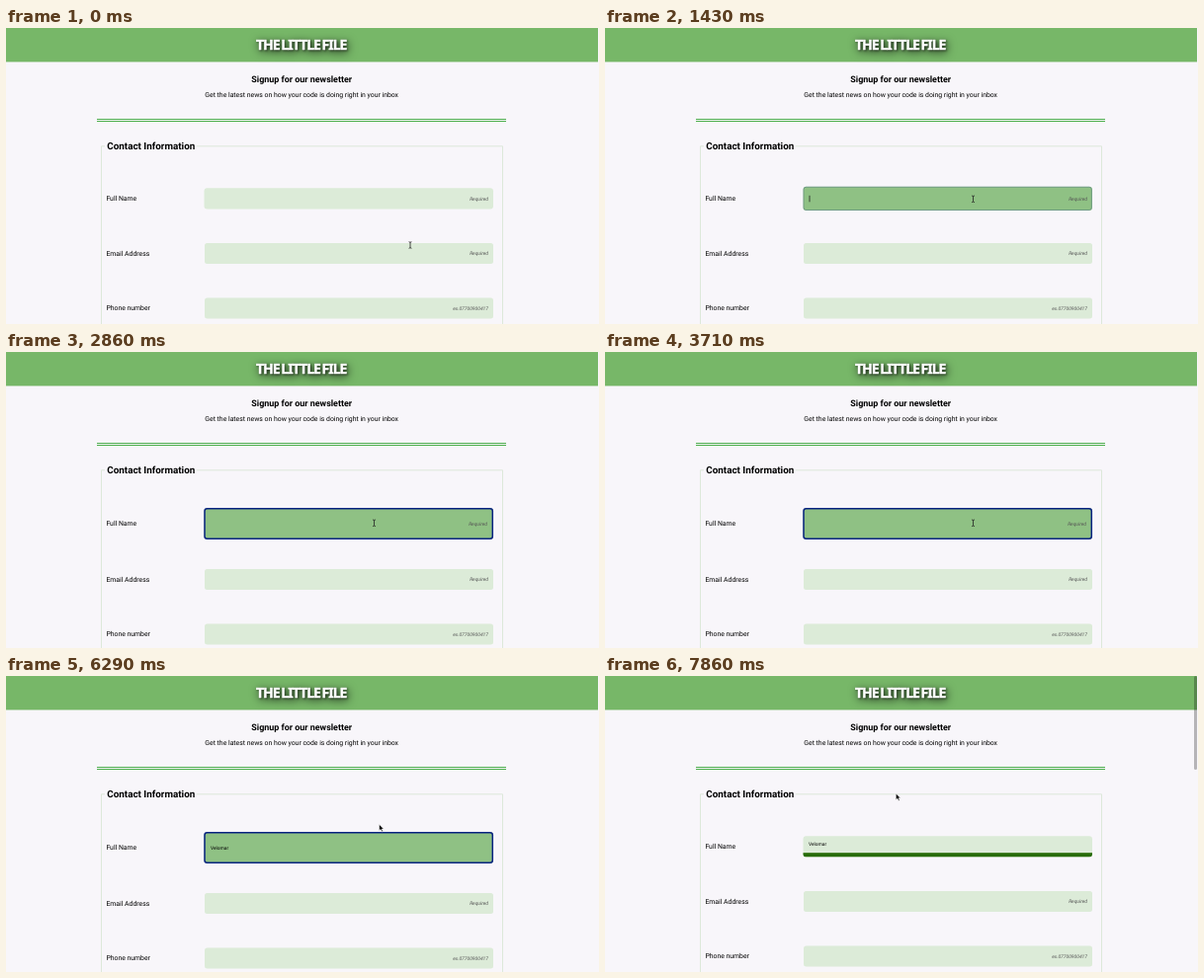
Recreate the animation shown at these times as an HTML page. Size 600 by 300 pixels, loop 8 s.

```html
<!DOCTYPE html>
<html lang="en">
<head>
<meta charset="utf-8">
<title>Newsletter signup</title>
<style>
  html, body { margin: 0; width: 100%; height: 100%; overflow: hidden; background: #f8f6fa; }
  svg { display: block; width: 600px; height: 300px; font: 6.87px Roboto, sans-serif; text-rendering: geometricPrecision; }
  .brand { font: 800 14px "Noto Sans", "Open Sans", sans-serif; font-stretch: 62.5%; letter-spacing: -1px; word-spacing: -1px;
    fill: #fff; stroke: #fff; stroke-width: .4;
    filter: drop-shadow(1px 1px 1px #0009) drop-shadow(1px 2px 4px #000a); }
  .mid { text-anchor: middle; }
  .bold { font-weight: 700; }
  .hint { font-size: 4.95px; font-style: italic; text-anchor: end; fill: #555; }
  .value { font-size: 4.9px; }
  .list { filter: drop-shadow(0 2px 2px #0005); }
</style>
</head>
<body>
<svg viewBox="0 0 600 300">
  <rect width="599" height="34.4" fill="#77b768"/>
  <text class="brand mid" x="298.7" y="21.8">THE LITTLE FILE</text>
  <text class="mid bold" x="299.2" y="55.2" font-size="8.93">Signup for our newsletter</text>
  <text class="mid" x="299.2" y="70.3">Get the latest news on how your code is doing right in your inbox</text>
  <path d="M92 92.5H506M92 94.5H506" stroke="#4cae4c"/>
  <path d="M100 119.8H96.5V300M193 119.8H502.5V300" fill="none" stroke="#dde8da"/>
  <text class="bold" x="102.3" y="123.1" font-size="9.85">Contact Information</text>

  <text id="nameLabel" x="101.4" y="175.3">Full Name</text>
  <g id="rows">
    <text x="101.4" y="231.1">Email Address</text>
    <rect x="201" y="218" width="292" height="21" rx="2.5" fill="#dcebd8"/>
    <text class="hint" x="488" y="230.3">Required</text>
    <text x="101.4" y="286.4">Phone number</text>
    <rect x="201" y="273.5" width="292" height="21" rx="2.5" fill="#dcebd8"/>
    <text class="hint" x="488" y="285.8">ex.07700900417</text>
  </g>

  <clipPath id="clip"><rect id="clipBox" x="200.5" width="292.5" rx="3"/></clipPath>
  <rect id="field" x="200.5" width="292.5" rx="3"/>
  <rect id="bar" x="200" width="294" clip-path="url(#clip)"/>
  <rect id="ring" x="201" width="291.3" rx="2.5" fill="none"/>
  <text id="nameHint" class="hint">Required</text>
  <text id="value" class="value"></text>
  <rect id="caret" width=".8" height="6.5" fill="#222"/>

  <g id="list">
    <rect class="list" x="200.5" y="190.3" width="292" height="8.5" fill="#fff"/>
    <text x="202" y="196.4" font-size="5.2">Velomar</text>
  </g>
  <rect id="thumb" x="596" width="3" height="95" rx="1.5" fill="#0004"/>

  <path id="arrow" d="M0 0V6.6L1.6 5.2L2.7 7.6L3.9 7.1L2.8 4.8H4.8Z" stroke="#fff" stroke-width=".6"/>
  <path id="beam" d="M-1.4-3.3Q0-3.3 0-2.4Q0-3.3 1.4-3.3M0-2.5V2.5M-1.4 3.3Q0 3.3 0 2.4Q0 3.3 1.4 3.3" fill="none" stroke="#222" stroke-width=".8"/>
</svg>
<script>
const LOOP = 8000, FOCUS = 1000, PICK = 5570, BLUR = 6860;
const KEYS = [4000, 4290, 4570];
const NAME = 'Velomar';
const $ = Object.fromEntries([...document.querySelectorAll('[id]')].map(e => [e.id, e]));

const set = (el, attrs) => { for (const k in attrs) el.setAttribute(k, attrs[k]); };
const show = (el, on) => set(el, { visibility: on ? 'visible' : 'hidden' });
const mix = (a, b, p) => a + (b - a) * p;

// Interpolates [time, value] stops.
function track(t, stops) {
  let i = 1;
  while (i < stops.length - 1 && t > stops[i][0]) i++;
  const [t0, a] = stops[i - 1], [t1, b] = stops[i];
  return mix(a, b, Math.min(1, Math.max(0, (t - t0) / (t1 - t0))));
}

const TOP = [[FOCUS, 162.3], [1430, 160.7], [2000, 158.3], [BLUR, 158.3], [7290, 158.8], [7860, 162.3]];
const BOTTOM = [[FOCUS, 183.5], [1430, 185], [2000, 189.8], [BLUR, 189.8], [7290, 186.7], [7860, 183.5]];
const MOUSE_X = [[140, 409], [710, 372.5], [4570, 372.5], [4860, 381.5], [5300, 378], [5710, 376],
  [6290, 377.5], [6860, 362], [7290, 332.5], [7860, 294.3]];
const MOUSE_Y = [[140, 220], [710, 173.3], [4570, 173.3], [4860, 207.2], [5300, 195], [5710, 194],
  [6290, 150.3], [6860, 126], [7290, 118], [7860, 119]];

function draw(t) {
  const focused = t >= FOCUS && t < BLUR, done = t >= BLUR;
  const top = track(t, TOP), bottom = track(t, BOTTOM);
  const shift = focused ? track(t, [[1430, 0], [2000, 1]]) : 0;
  const grown = focused ? track(t, [[FOCUS, 0], [2000, 1]]) : 0;
  const box = { y: top, height: bottom - top };

  set($.field, { ...box, fill: focused ? '#8fc184' : '#dcebd8' });
  set($.clipBox, box);
  set($.ring, {
    y: top + .5, height: bottom - top - 1,
    stroke: `rgba(10,36,130,${grown ** 1.6})`, 'stroke-width': mix(.5, 1.5, grown)
  });
  show($.ring, focused);

  const fade = track(t, [[BLUR, 0], [7290, .1], [7860, 1]]);
  const thick = track(t, [[BLUR, 1], [7860, 4.3]]);
  set($.bar, {
    y: bottom - thick, height: thick,
    fill: `rgb(${mix(8, 40, fade)},${mix(32, 108, fade)},${mix(110, 8, fade)})`
  });
  show($.bar, done);

  set($.nameLabel, { transform: `translate(0 ${shift * 1.2})` });
  set($.rows, { transform: `translate(0 ${shift * 2})` });

  const typed = KEYS.filter(k => t >= k).length;
  const text = t >= PICK ? NAME : NAME.toLowerCase().slice(0, typed);
  const base = track(t, [[1430, 174.8], [2000, 175.8], [BLUR, 175.8], [7290, 173.7], [7860, 172.2]]);
  const left = track(t, [[FOCUS, 206], [1430, 207], [BLUR, 207], [7290, 206]]);
  set($.value, { x: left, y: base });
  if ($.value.textContent !== text) $.value.textContent = text;
  set($.nameHint, { x: 488 - shift, y: base });
  show($.nameHint, !text);

  // The blink restarts on every edit.
  const edit = [FOCUS, ...KEYS, PICK].filter(k => t >= k).pop();
  show($.caret, focused && (t - edit) % 1000 < 500);
  set($.caret, { x: left + (text ? $.value.getComputedTextLength() : -.4), y: base - 5 });
  show($.list, t >= KEYS[0] && t < PICK);
  show($.thumb, done);

  const x = track(t, MOUSE_X), y = track(t, MOUSE_Y);
  const overField = (y > top && y < bottom) || t < 710;
  const hidden = t >= KEYS[0] && t < KEYS[2];
  set($.arrow, { transform: `translate(${x} ${y})` });
  set($.beam, { transform: `translate(${x} ${y})` });
  show($.arrow, !overField && !hidden);
  show($.beam, overField && !hidden);
}

const start = performance.now();
function frame() {
  draw((performance.now() - start) % LOOP);
  requestAnimationFrame(frame);
}
frame();
</script>
</body>
</html>
```
